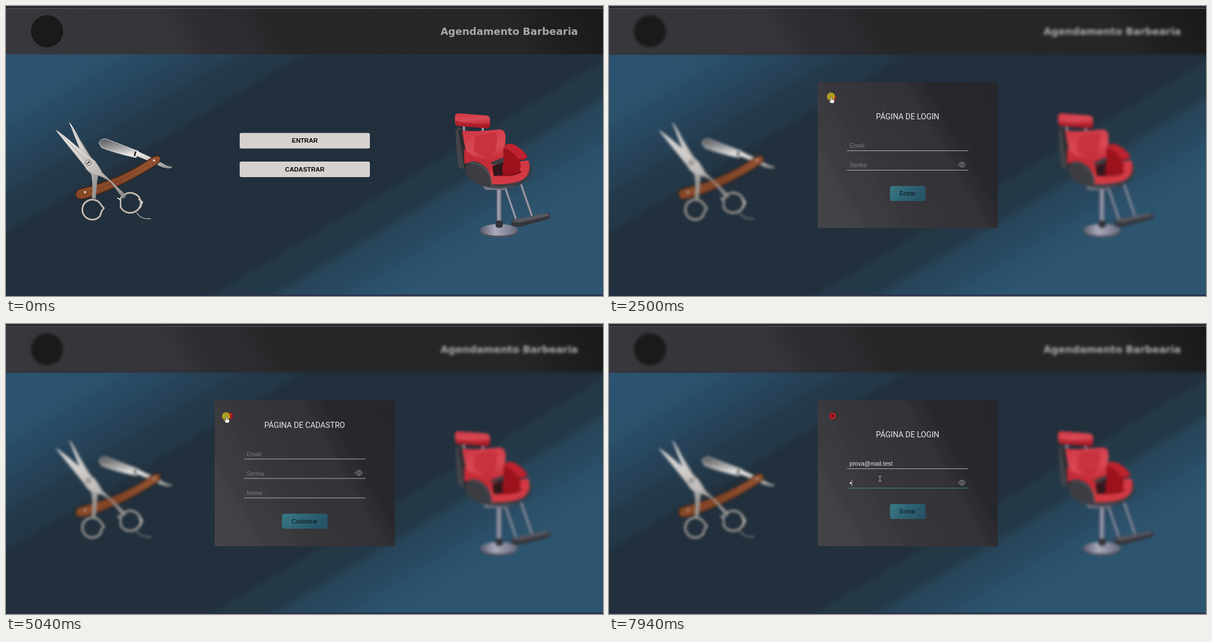
An HTML page that plays this animation: 1073 by 522 pixels, repeating every 8 s.

```html
<!DOCTYPE html>
<html lang="pt-BR">
<head>
<meta charset="utf-8">
<title>Agendamento Barbearia</title>
<style>
html, body { margin: 0; width: 100%; height: 100%; overflow: hidden; background: #21303c; }
svg { display: block; width: 100vw; height: 100vh; }
text { font: 10.7px "Liberation Sans", Arial, sans-serif; white-space: pre; }
.brand { font: bold 18px "DejaVu Sans", sans-serif; fill: #a9a8a7; text-anchor: end; }
.home { font-weight: bold; font-size: 11.2px; text-anchor: middle; }
.title { font: 14px Roboto, sans-serif; fill: #e9e9e9; text-anchor: middle; }
.hint { fill: #7d7c7f; }
.value { fill: #e6e6e6; }
.go { fill: #0b1217; text-anchor: middle; }
.item { font: 7.5px "Open Sans", sans-serif; fill: #ececec; }
.line { fill: none; stroke-linecap: round; stroke-linejoin: round; }
</style>
</head>
<body>
<svg viewBox="0 0 1073 522" preserveAspectRatio="none">
<defs id="defs">
  <linearGradient id="steel" x2="1" y2="1"><stop stop-color="#f4f2f0"/><stop offset=".5" stop-color="#c9c5c2"/><stop offset="1" stop-color="#8b8987"/></linearGradient>
  <linearGradient id="razor" x2=".3" y2="1"><stop stop-color="#55565a"/><stop offset=".45" stop-color="#8f9092"/><stop offset="1" stop-color="#e9e7e5"/></linearGradient>
  <linearGradient id="wood" x2="1"><stop stop-color="#8a4a28"/><stop offset=".5" stop-color="#7a3f22"/><stop offset="1" stop-color="#93512e"/></linearGradient>
  <linearGradient id="red" y2="1" x2=".2"><stop stop-color="#cf3442"/><stop offset=".5" stop-color="#d94a55"/><stop offset="1" stop-color="#b81d2a"/></linearGradient>
  <linearGradient id="chrome" x2="1"><stop stop-color="#5b5c6c"/><stop offset=".4" stop-color="#a9aabb"/><stop offset="1" stop-color="#666779"/></linearGradient>
  <linearGradient id="teal" x2="1" y2=".3"><stop stop-color="#3a7884"/><stop offset=".5" stop-color="#2f6675"/><stop offset="1" stop-color="#265467"/></linearGradient>
</defs>

<rect y="87" width="1073" height="435" fill="url(#floor)"/>
<rect y="519.5" width="1073" height="3" fill="#29304a"/>

<g id="scene">
  <rect x="-20" y="-10" width="1113" height="97" fill="url(#bar)"/>
  <circle cx="73.7" cy="45.5" r="29" fill="#1b1a1a"/>
  <text class="brand" x="1028" y="52">Agendamento Barbearia</text>

  <!-- straight razor -->
  <path d="M167 247Q169 239 179 239L237 261 234 273Q200 266 172 255Z" fill="url(#razor)" stroke="#e0dddb"/>
  <path d="M236 260L240 263 264 274 283 284Q291 289 299 289Q298 293 289 292Q277 290 269 284L235 270Z" fill="url(#steel)"/>
  <path d="M233 262L231 270" stroke="#222" stroke-width="3"/>
  <path d="M125 339Q126 331 134 329Q208 311 262 273Q272 267 277 272Q279 279 271 285Q210 326 144 346Q126 351 125 339Z" fill="url(#wood)" stroke="#3c2116" stroke-width="1.5"/>
  <path class="line" d="M148 338Q213 319 262 283M146 331Q208 315 256 281" stroke="#a8653d" stroke-width="1.5" opacity=".6"/>
  <circle cx="142" cy="335" r="2" fill="#e2d8cf"/><circle cx="266" cy="278" r="2" fill="#e2d8cf"/>

  <!-- scissors -->
  <path d="M113 208Q121 217 132 239L165 292Q167 303 164 314L161 348 154 349Q157 319 153 303L143 284Z" fill="url(#steel)"/>
  <path d="M89 223Q100 229 124 250L160 279Q168 290 173 300L216 341 211 347 189 318Q176 306 157 303Q146 299 141 288Z" fill="url(#steel)" stroke="#9a9795" stroke-width=".6"/>
  <path class="line" d="M97 229L143 277M117 217L150 270" stroke="#817e7c" stroke-width=".8"/>
  <circle cx="148" cy="282" r="5" fill="#d8d5d3" stroke="#504d4b"/><path d="M146 284L150 280" stroke="#222" stroke-width="2"/>
  <g class="line">
    <path d="M169 378A18 18 0 1 1 171 358L176 364 172 369 169 378M205 349A19 18 0 1 1 206 362M239 348L245 353 241 363" stroke="#45413f" stroke-width="4.4"/>
    <path d="M169 378A18 18 0 1 1 171 358L176 364 172 369 169 378M205 349A19 18 0 1 1 206 362V349L201 346M239 348L245 353 241 363" stroke="#c9c5c1" stroke-width="2.5"/>
    <path d="M235 372Q241 384 260 383" stroke="#a7a5a3" stroke-width="1.6"/>
  </g>

  <!-- barber chair -->
  <ellipse cx="886" cy="406" rx="33.5" ry="11" fill="#4f505f"/>
  <ellipse cx="886" cy="403" rx="33.5" ry="10.5" fill="url(#chrome)"/>
  <rect x="881.5" y="325" width="9" height="70" fill="url(#chrome)"/>
  <path d="M880 388Q886 384 893 388V397Q886 402 880 397Z" fill="#33333a"/>
  <path class="line" d="M898 329L917 385M926 322L945 377" stroke="#686a7a" stroke-width="4.5"/>
  <path class="line" d="M898 329L917 385M926 322L945 377" stroke="#aeb0bd" stroke-width="1.6"/>
  <path d="M908 388Q908 385 914 384L971 373Q979 372 979 378Q979 382 974 384L926 397Q910 399 908 394Z" fill="#35353c"/>
  <path d="M909 388L914 384 971 373 979 377 923 390Z" fill="#57575f"/>
  <path d="M855 322L899 325 894 331H862Z" fill="#777887"/>
  <path class="line" d="M823 214V226M857 217V228" stroke="#9699a6" stroke-width="4"/>
  <path d="M813 193L863 197Q870 198 870 205V214Q870 220 863 220L812 216Q807 215 807 207V199Q807 193 813 193Z" fill="url(#red)"/>
  <path d="M808 206Q832 214 870 212V215Q869 220 863 220L812 216Q808 215 808 206Z" fill="#a31722" opacity=".65"/>
  <path d="M808 225Q812 216 820 221L834 291Q822 297 813 289Q809 260 808 225Z" fill="#43444a"/>
  <path d="M813 222L822 223 832 292 824 294Z" fill="#2b2c31"/>
  <path d="M820 224Q842 227 888 222Q898 223 898 238L894 287 868 301 832 273Q825 262 820 224Z" fill="url(#red)"/>
  <path d="M844 234L881 228Q887 260 868 274Q852 269 840 260Z" fill="#c42b38" opacity=".7"/>
  <path d="M868 283L895 272 926 276Q946 279 945 299Q942 314 916 325Q886 332 860 324Z" fill="#3b3c42"/>
  <path d="M868 286L896 283 939 278Q945 298 932 310Q918 322 871 321Z" fill="#d33943"/>
  <path d="M873 289L898 284 927 298Q920 308 877 306Z" fill="#84101a"/>
  <path d="M875 287L894 282 892 304 877 306Z" fill="#30171b"/>
  <path d="M894 256Q899 244 914 250Q932 260 937 271Q935 278 923 277Q928 290 920 301L896 304Q889 294 894 284Z" fill="#9b121d"/>
  <path d="M894 256Q899 244 914 250Q932 260 937 271Q932 278 920 275Q909 258 894 256Z" fill="#bd222e"/>
  <path d="M823 256Q836 274 861 274Q874 277 872 290L869 302Q858 288 836 281L824 284Z" fill="#c52c37"/>
  <path d="M826 293Q829 277 844 280Q866 286 871 308L874 327Q852 325 836 315Q826 307 826 293Z" fill="#3c3d43"/>
  <path d="M836 282Q860 284 871 308L873 323Q878 328 912 325" class="line" stroke="#5b5c64" stroke-width="1.5"/>
</g>

<rect width="1073" height="5" fill="#2b2a30"/>
<rect y="4" width="1073" height="1" fill="#5b5a60"/>

<g id="menu">
  <rect id="enter" x="420" y="228.5" width="234" height="28" rx="3"/><text class="home" x="537" y="246">ENTRAR</text>
  <rect id="join" x="420" y="280" width="234" height="28" rx="3"/><text class="home" x="537" y="297.5">CADASTRAR</text>
</g>

<g id="modal">
  <rect x="375" y="137" width="324" height="263" rx="4" fill="url(#panel)"/>
  <circle cx="401.7" cy="165.5" r="4.1" fill="#301317" stroke="#b41c1f" stroke-width="4"/>
  <g id="login"></g>
  <g id="signup"></g>
  <g id="list"></g>
</g>

<circle id="spot" r="7.3" fill="#b9ae1c" opacity=".88"/>
<g id="pointer">
  <path id="arrow" d="M0 0V10L2.3 7.9 4 11.4 5.7 10.7 4.1 7.2H7.2Z" fill="#fff" stroke="#16191d" stroke-width=".6"/>
  <path id="hand" d="M0 .5Q1.3 -.5 1.8 1V5L5.2 6Q6.4 6.5 6 8.5L5 12H-.6L-3.2 8Q-3 6.4 -.4 7.7Z" fill="#fff" stroke="#222" stroke-width=".6"/>
  <path id="beam" class="line" d="M-2.5 -4.5H-.6L0 -4 .6 -4.5H2.5M0 -4V4M-2.5 4.5H-.6L0 4 .6 4.5H2.5" stroke="#b9b9b9" stroke-width="1"/>
</g>
</svg>

<script>
const $ = id => document.getElementById(id);
const show = (id, on) => $(id).style.display = on ? '' : 'none';

// Diagonal gradient over a box, with the angle measured as in CSS
function gradient(id, x, y, w, h, deg, stops) {
  const a = deg * Math.PI / 180, s = Math.sin(a), c = -Math.cos(a);
  const r = (w * Math.abs(s) + h * Math.abs(c)) / 2, cx = x + w / 2, cy = y + h / 2;
  const marks = stops.split(',').map(m => {
    const [color, at] = m.trim().split(' ');
    return `<stop offset="${at}%" stop-color="#${color}"/>`;
  }).join('');
  $('defs').insertAdjacentHTML('beforeend', `<linearGradient id="${id}" gradientUnits="userSpaceOnUse"
    x1="${cx - s * r}" y1="${cy - c * r}" x2="${cx + s * r}" y2="${cy + c * r}">${marks}</linearGradient>`);
}
gradient('floor', 0, 87, 1073, 435, 149,
  '2c5470 0, 2b526d 11, 294b64 13.5, 284860 17, 27435a 18.5, 264054 22, 243a4b 24, 233746 29, 21303c 30.5, 21303c 60, 243846 61.5, 243947 66, 28455a 68, 294a62 73, 2b5069 75, 2d556f 80, 2d556f 100');
gradient('bar', 0, 5, 1073, 82, 60,
  '38373c 0, 353439 29, 2e2d31 33, 2c2b2f 41, 272729 45, 262628 84, 212122 88, 1c1b1b 97, 1b1a1a 100');
gradient('panel', 375, 137, 324, 263, 60,
  '444348 0, 424146 17, 3d3c41 20, 3b3a3f 31, 38373c 34, 353439 48, 333237 64, 2e2d31 67, 2c2c30 70, 27282b 73, 26272a 100');

const field = (name, y) => `<text class="hint" x="432.5" y="${y - 5.5}">${name}</text>
  <rect x="428" y="${y - .5}" width="218" height="1" fill="#b4b4b6"/>` +
  (name == 'Senha' ? `<g transform="translate(634.5 ${y - 10})" class="line" stroke="#a5a5a8">
    <path d="M-6.2 0Q0 -9.5 6.2 0Q0 9.5 -6.2 0Z"/><circle r="2.3"/></g>` : '');

function form(id, title, names, top, button, width) {
  const y = top + 39 + 35 * names.length;
  $(id).innerHTML = `<text class="title" x="536.7" y="${top}">${title}</text>` +
    names.map((name, i) => field(name, top + 56.5 + 35 * i)).join('') +
    `<rect x="${537 - width / 2}" y="${y + 11}" width="${width}" height="27" rx="4" fill="url(#teal)"/>
    <text class="go" x="536.7" y="${y + 28}">${button}</text>`;
}
form('login', 'PÁGINA DE LOGIN', ['Email', 'Senha'], 204, 'Entrar', 64);
form('signup', 'PÁGINA DE CADASTRO', ['Email', 'Senha', 'Nome'], 186.5, 'Cadastrar', 82);

$('login').insertAdjacentHTML('beforeend', `<text id="mail" class="value" x="432.3" y="254.5"></text>
  <circle id="dot" cx="434.3" cy="286.3" r="1.7" fill="#e6e6e6"/>
  <rect id="focus" x="428" width="218" height="1" fill="#2c8a72"/>
  <rect id="caret" width=".8" height="12" fill="#d5d5d5"/>`);
const hints = $('login').querySelectorAll('.hint');

const address = 'prova@mail.test';
const saved = ['lucajogos27@mail.test', 'lj402795@mail.test', 'dud@dododo', 'udu@dudu', 'odod@dodod', 'uum@dud'];
const list = items => `<path d="M492.5 266L497 262 501.5 266Z" fill="#1f1f1f"/>
  <rect x="485" y="265.5" width="113" height="${items.length * 21 + 6.5}" rx="2" fill="#1f1f1f"/>` +
  items.map((item, i) => `<text class="item" x="492" y="${281.7 + 21 * i}">${item}</text>`).join('');

// Pointer path: time, x, y
const path = [
  [190, 938, 503], [430, 705, 310], [560, 662, 268], [760, 503, 268], [940, 573, 266], [1010, 577, 262],
  [1110, 567, 247], [1740, 567, 247], [2080, 480, 200], [2330, 390, 166], [2500, 399, 163], [2640, 399, 163],
  [2840, 470, 215], [2980, 470, 215], [3130, 561, 287], [3330, 596, 300], [3700, 604, 326], [3790, 604, 326],
  [4200, 480, 240], [4550, 386, 174], [4700, 412, 169], [4840, 398, 167], [4970, 398, 167], [5040, 395.5, 166],
  [5180, 395.5, 166], [5430, 527, 243], [5930, 527, 243], [6190, 523.5, 247.5], [6960, 523.5, 247.5], [7200, 487, 278.5]
];
const clicks = [[1140, 1240], [2440, 2570], [3340, 3450], [4970, 5110], [5450, 5550], [6390, 6610], [7240, 7340]];
const visits = [[1190, 1480, 2540, 2840], [3420, 3730, 5080, 5350], [5510, 5800, 9000, 9001]];

const clamp = v => Math.max(0, Math.min(1, v));
const within = (v, a, b) => v >= a && v < b;

function place(t) {
  const i = path.findIndex(p => p[0] > t);
  if (i < 1) return (i ? path[path.length - 1] : path[0]).slice(1);
  const [a, x, y] = path[i - 1], [b, u, v] = path[i], k = (t - a) / (b - a);
  return [x + (u - x) * k, y + (v - y) * k];
}

let listed = -1;
function draw(t) {
  const [x, y] = place(t);
  const open = Math.max(...visits.map(([a, b, c, d]) => Math.min(clamp((t - a) / (b - a)), clamp((d - t) / (d - c)))));
  const signup = within(t, 3400, 5400);
  show('modal', open > 0);
  $('modal').style.opacity = open;
  $('scene').style.filter = open ? `blur(${2.7 * open}px)` : '';
  show('menu', open < 1);
  show('login', !signup);
  show('signup', signup);

  const hover = (id, top) => $(id).setAttribute('fill',
    open < .1 && t >= 190 && within(x, 420, 654) && within(y, top, top + 28) ? '#8b9094' : '#d6d2cf');
  hover('enter', 228.5);
  hover('join', 280);

  const typed = t < 6800 ? 0 : t < 6900 ? 1 : t < 7300 ? 2 : address.length;
  const onMail = within(t, 6420, 7400), onPass = t >= 7400, filled = t >= 7930;
  $('mail').textContent = address.slice(0, typed);
  hints[0].style.display = typed ? 'none' : '';
  hints[1].style.display = filled ? 'none' : '';
  show('dot', filled);
  show('focus', onMail || onPass);
  show('caret', onMail || onPass);
  $('focus').setAttribute('y', onPass ? 294.9 : 259.9);
  $('caret').setAttribute('y', onPass ? 280 : 245);
  $('caret').setAttribute('x', onPass ? (filled ? 436.3 : 432) : 432 + (typed ? $('mail').getComputedTextLength() : 0));

  const rows = !within(t, 6450, 7300) ? 0 : typed ? 1 : saved.length;
  if (rows != listed) {
    $('list').innerHTML = rows ? list(rows == 1 ? [address] : saved) : '';
    listed = rows;
  }

  const onClose = Math.hypot(x - 401.7, y - 165.5) < 9;
  const lines = signup ? [243, 278, 313] : [260, 295];
  const onField = within(x, 428, 646) && lines.some(l => within(y, l - 18, l + 1)) && !(rows && y > 265);
  const kind = open < .5 ? 'arrow' : onClose ? 'hand' : onField ? 'beam' : 'arrow';
  for (const id of ['arrow', 'hand', 'beam']) show(id, id == kind);
  show('pointer', t >= 190);
  show('spot', clicks.some(([a, b]) => within(t, a, b)));
  for (const id of ['pointer', 'spot']) $(id).setAttribute('transform', `translate(${x} ${y})`);
}

const start = performance.now();
function tick() {
  draw((performance.now() - start) % 8000);
  requestAnimationFrame(tick);
}
tick();
</script>
</body>
</html>
```
